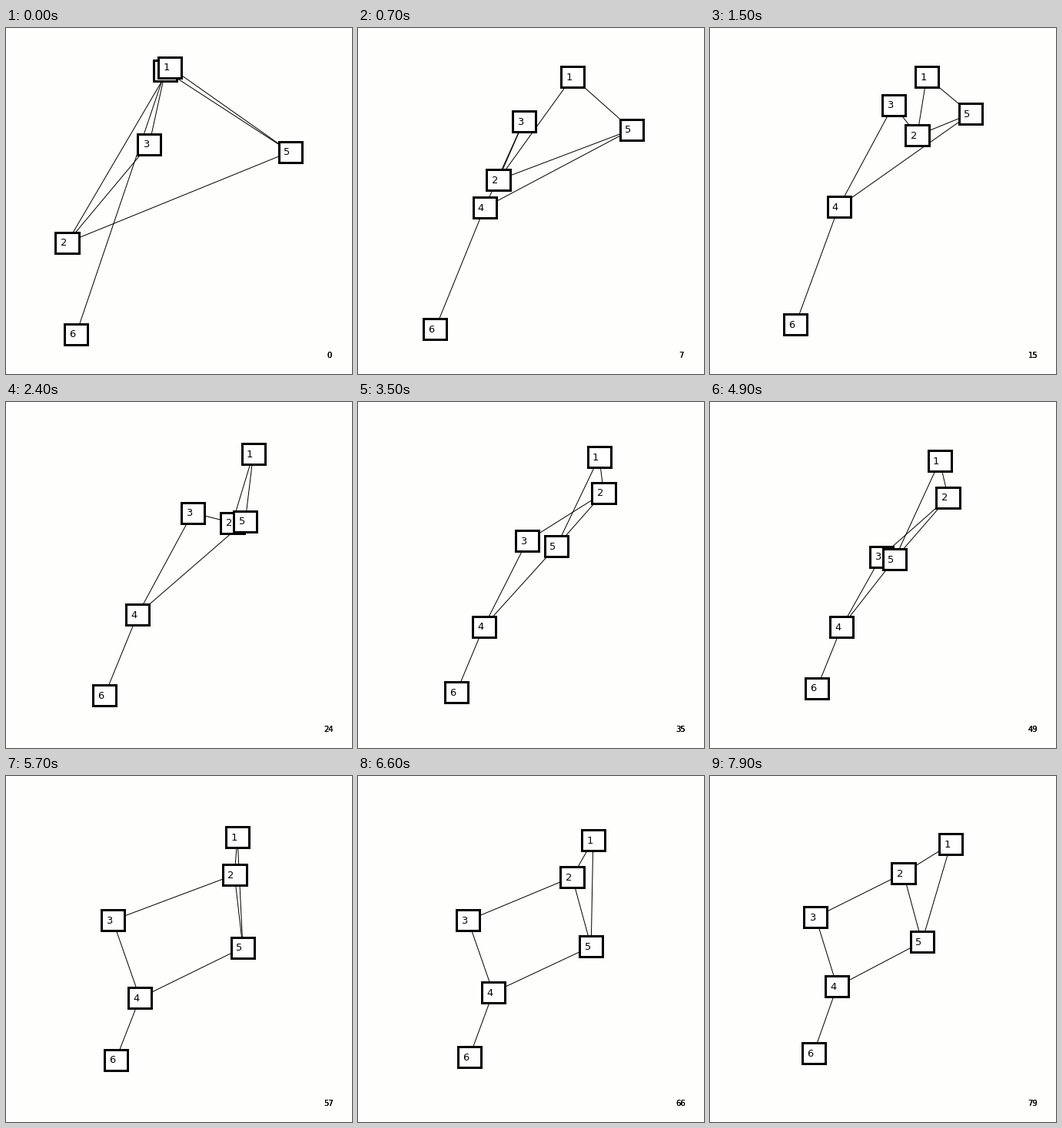
These frames come from a looping animation (450 px wide and 450 px high, 8 s). A matplotlib script:

```python
from itertools import combinations

import numpy as np
import matplotlib.pyplot as plt
from matplotlib.animation import FuncAnimation
from matplotlib.patches import Rectangle

SIZE, DPI = 450, 100
FRAMES, INTERVAL = 80, 100
PX = 72 / DPI

EDGES = [(1, 2), (1, 5), (2, 3), (2, 5), (3, 4), (4, 5), (4, 6)]
STACK = [6, 4, 3, 2, 5, 1]  # bottom to top
CROWDED, KICK = 20, 4.7     # boxes this close fling each other apart

# Key poses of the spring layout
T = np.array([0, 15, 24, 35, 49, 66, 79], float)


def relax(tau):
    return np.exp(-T / tau)


def path(x, y):
    return np.column_stack([x, y]).astype(float)


KEYS = {
    1: path([213.3, 281.8, 321.7, 313.7, 298.7, 305.8, 313.2],
            58.3 + 0.38 * T - 7.3 * relax(5)),
    2: path([79.5, 269.4, 294.5, 319.5, 309.8, 278.5, 251.5],
            [279, 139.8, 157, 118, 124, 131.5, 126.6]),
    3: path([186.4, 238.7, 242.7, 220.2, 222.6, 143.2, 137.3],
            [151, 100, 144.2, 180.5, 201, 187.8, 183.5]),
    4: path([207.3, 167.5, 171.2, 163.7, 171.2, 175.8, 165.3],
            [55.6, 232.5, 276.4, 292, 292.5, 281.5, 273.8]),
    5: path([369.5, 339, 311.2, 258.2, 240, 303.2, 275.6],
            [161, 111.5, 155, 187.5, 204.5, 221.8, 215.8]),
}
# 6 hangs from 4 on a slowly tightening spring
KEYS[6] = path(KEYS[4][:, 0] - 30.5 - 85.5 * relax(12.5),
               391 - 0.385 * T + 7 * relax(5))


def tangents(pts):
    """Monotone slopes: flat at turning points, secant at the ends."""
    d = np.diff(pts, axis=0) / np.diff(T)[:, None]
    a, b = d[:-1], d[1:]
    turning = a * b <= 0
    m = np.vstack([d[:1], a, d[-1:]])
    m[1:-1] = np.where(turning, 0, 2 * a * b / np.where(turning, 1, a + b))
    return m


# Slopes leaving and reaching each key pose
arrive = {n: tangents(p) for n, p in KEYS.items()}
leave = {n: m.copy() for n, m in arrive.items()}
for a, b in combinations(KEYS, 2):
    gaps = np.hypot(*(KEYS[a] - KEYS[b]).T)
    for i in np.flatnonzero(gaps[:-1] < CROWDED):
        for n in (a, b):
            leave[n][i] = KICK * (KEYS[n][i + 1] - KEYS[n][i]) / (T[i + 1] - T[i])


def position(n, t):
    i = min(np.searchsorted(T, t, side="right") - 1, len(T) - 2)
    h = T[i + 1] - T[i]
    s = (t - T[i]) / h
    p, q = KEYS[n][i], KEYS[n][i + 1]
    return (p + (q - p) * s * s * (3 - 2 * s)
            + h * s * (1 - s) * ((1 - s) * leave[n][i] - s * arrive[n][i + 1]))


plt.rcParams["font.family"] = "DejaVu Sans"
fig = plt.figure(figsize=(SIZE / DPI, SIZE / DPI), dpi=DPI, facecolor="#fefefd")
ax = fig.add_axes([0, 0, 1, 1])
ax.set_xlim(0, SIZE)
ax.set_ylim(SIZE, 0)
ax.axis("off")

lines = [ax.plot([], [], color="black", lw=PX, zorder=1)[0] for _ in EDGES]
boxes, labels = {}, {}
for z, n in enumerate(STACK, 2):
    boxes[n] = ax.add_patch(Rectangle((0, 0), 31 if n == 2 else 30, 27,
                                      fc="white", ec="black", lw=3 * PX,
                                      joinstyle="miter", zorder=z))
    labels[n] = ax.text(0, 0, str(n), fontsize=13 * PX, zorder=z + 0.5)
# Overprinted for a heavier stroke
counters = [ax.text(420, 429, "", fontsize=10 * PX, ha="center") for _ in range(3)]


def update(frame):
    pos = {n: position(n, frame) for n in KEYS}
    for line, (a, b) in zip(lines, EDGES):
        line.set_data(*zip(pos[a], pos[b]))
    for n, (x, y) in pos.items():
        boxes[n].set_xy((x - boxes[n].get_width() / 2, y - 13.5))
        labels[n].set_position((x - 8.7, y + 4.3))
    for text in counters:
        text.set_text(str(frame))
    return [*lines, *boxes.values(), *labels.values(), *counters]


anim = FuncAnimation(fig, update, frames=FRAMES, interval=INTERVAL,
                     repeat=True, repeat_delay=0)
plt.show()
```
